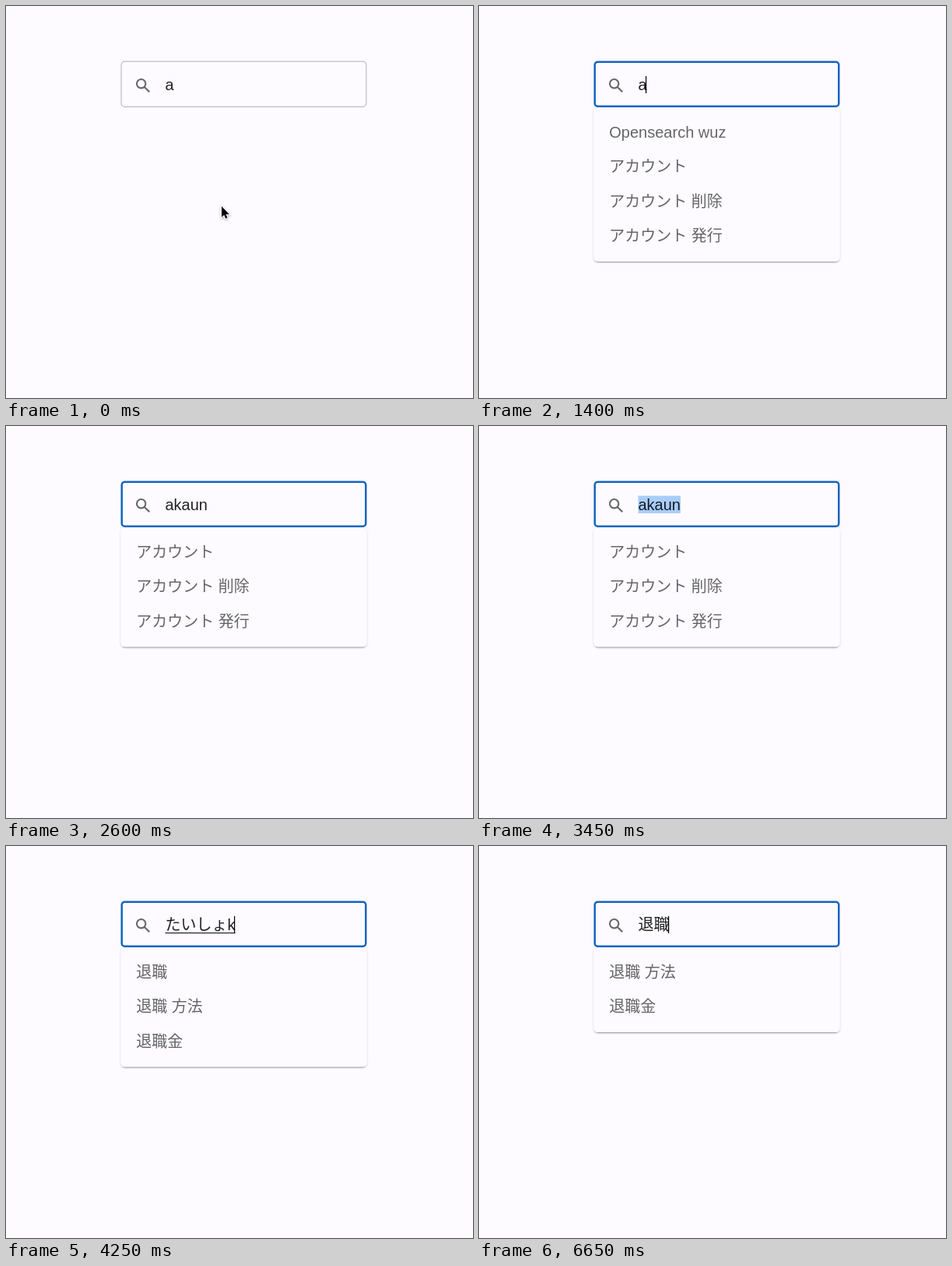
These frames come from a looping animation (600x503 px, 6800 ms). An HTML page with a canvas:

```html
<!DOCTYPE html>
<html lang="ja">
<head>
<meta charset="utf-8">
<title>Search suggestions</title>
<style>
  html, body { margin: 0; width: 100%; height: 100%; overflow: hidden; background: #fdfbff; }
  canvas { display: block; }
</style>
</head>
<body>
<canvas id="stage" width="600" height="503"></canvas>
<script>
const ctx = document.getElementById('stage').getContext('2d');
const LOOP = 6800;
const BACKGROUND = '#fdfbff';
const FONT = '20px "Liberation Sans", "Noto Sans CJK JP", "Noto Sans CJK", sans-serif';
const BOX = { x: 147.5, y: 70.5, w: 316, h: 59.5, radius: 5 };
const TEXT_X = 204.5;
const ROW_HEIGHT = 44.45;
const FOCUS_TIME = 600;

const account = ['アカウント', 'アカウント 削除', 'アカウント 発行'];
const retire = ['退職', '退職 方法', '退職金'];
const search = 'Opensearch wuz';

// [start time, text, style]
const inputs = [
  [0, 'a'], [FOCUS_TIME, 'a'], [900, ''],
  [1250, 'a'], [1450, 'ak'], [1600, 'aka'], [1800, 'akau'], [2100, 'akaun'],
  [3450, 'akaun', 'selected'],
  [3650, 't', 'composing'], [3750, 'た', 'composing'], [3850, 'たい', 'composing'],
  [3950, 'たいs', 'composing'], [4050, 'たいsh', 'composing'], [4100, 'たいしょ', 'composing'],
  [4200, 'たいしょk', 'composing'], [4300, 'たいしょく', 'composing'],
  [4450, '退職', 'composing'], [4650, '退職']
];

// [start time, suggestions]
const lists = [
  [0, []],
  [1350, [search, ...account]],
  [1500, [...account, ...retire]],
  [1800, account],
  [3700, [search, ...account, ...retire, 'Opensearch']],
  [3900, retire],
  [4400, [...retire, ...account]],
  [4600, retire.slice(1)]
];

const current = (events, t) => events.findLast(event => event[0] <= t);

function roundedRect(x, y, w, h, radius) {
  ctx.beginPath();
  ctx.roundRect(x, y, w, h, radius);
}

function drawPanel(items) {
  if (!items.length) return;
  const top = BOX.y + BOX.h;
  const layers = [[2.5, 1.2, 1.2, .2], [1.2, 1.2, 0, .14], [1.2, 3.7, 0, .12]];
  const height = 20 + ROW_HEIGHT * items.length;
  ctx.save();
  ctx.beginPath();
  ctx.rect(0, top, 600, 503);
  ctx.clip();
  ctx.fillStyle = BACKGROUND;
  for (const [offset, blur, inset, alpha] of layers) {
    ctx.shadowColor = `rgba(0,0,0,${alpha})`;
    ctx.shadowOffsetY = offset;
    ctx.shadowBlur = blur;
    roundedRect(BOX.x + inset, top + inset, BOX.w - 2 * inset, height - 2 * inset, BOX.radius);
    ctx.fill();
  }
  ctx.shadowColor = 'transparent';
  roundedRect(BOX.x, top, BOX.w, height, BOX.radius);
  ctx.fill();
  ctx.fillStyle = 'rgba(0,0,0,.6)';
  items.forEach((item, i) => ctx.fillText(item, 167.3, 169 + i * ROW_HEIGHT));
  ctx.restore();
}

function drawBox(focused, hovered) {
  const line = focused ? 2.5 : 1.2;
  roundedRect(BOX.x + line / 2, BOX.y + line / 2, BOX.w - line, BOX.h - line, BOX.radius - line / 2);
  ctx.lineWidth = line;
  ctx.strokeStyle = focused ? '#1565c0' : hovered ? 'rgba(0,0,0,.87)' : 'rgba(0,0,0,.25)';
  ctx.stroke();
}

function drawMagnifier() {
  ctx.strokeStyle = '#666';
  ctx.lineWidth = 2.1;
  ctx.beginPath();
  ctx.arc(173.7, 99.7, 5.7, 0, 7);
  ctx.moveTo(177.9, 103.9);
  ctx.lineTo(184.3, 110.3);
  ctx.stroke();
}

function drawInput(t) {
  const [start, text, style] = current(inputs, t);
  const width = ctx.measureText(text).width;
  if (style === 'selected') {
    ctx.fillStyle = '#a8cdfb';
    ctx.fillRect(TEXT_X, 89.5, width, 22.5);
  }
  ctx.fillStyle = 'rgba(0,0,0,.87)';
  ctx.fillText(text, TEXT_X, 108);
  if (style === 'composing') ctx.fillRect(TEXT_X, 111, width, 1.2);
  const blinkOn = Math.floor((t - start) / 500) % 2 === 0;
  if (t >= FOCUS_TIME && style !== 'selected' && blinkOn) {
    ctx.fillStyle = '#000';
    ctx.fillRect(Math.floor(TEXT_X + width - .7), 90, 1.2, 22);
  }
}

function pointerAt(t) {
  const p = Math.min(1, Math.max(0, (t - 50) / 500));
  const eased = p * p * (3 - 2 * p);
  return { x: 277 - 22 * eased, y: 257 - 156 * eased };
}

function drawArrow(x, y) {
  const outline = [[0, 0], [0, 14], [3.2, 11], [5.3, 15.8], [7.5, 14.8], [5.5, 10.2], [10, 10.2]];
  ctx.save();
  ctx.translate(x, y);
  ctx.beginPath();
  outline.forEach(point => ctx.lineTo(...point));
  ctx.closePath();
  ctx.shadowColor = 'rgba(0,0,0,.35)';
  ctx.shadowBlur = 3;
  ctx.shadowOffsetY = 1;
  ctx.strokeStyle = '#fff';
  ctx.lineWidth = 2;
  ctx.stroke();
  ctx.shadowColor = 'transparent';
  ctx.fillStyle = '#000';
  ctx.fill();
  ctx.restore();
}

function drawBeam(x, y) {
  ctx.strokeStyle = '#222';
  ctx.lineWidth = 1.2;
  ctx.beginPath();
  for (const side of [-1, 1]) {
    ctx.moveTo(x - 3.5, y + side * 9);
    ctx.quadraticCurveTo(x, y + side * 9, x, y + side * 6);
    ctx.quadraticCurveTo(x, y + side * 9, x + 3.5, y + side * 9);
  }
  ctx.moveTo(x, y - 7);
  ctx.lineTo(x, y + 7);
  ctx.stroke();
}

function draw(t) {
  const pointer = pointerAt(t);
  const hovered = pointer.y < BOX.y + BOX.h;
  ctx.fillStyle = BACKGROUND;
  ctx.fillRect(0, 0, 600, 503);
  ctx.font = FONT;
  drawPanel(current(lists, t)[1]);
  drawBox(t >= FOCUS_TIME, hovered);
  drawMagnifier();
  drawInput(t);
  if (t < 900) (hovered ? drawBeam : drawArrow)(pointer.x, pointer.y);
}

const began = performance.now();
function frame() {
  draw((performance.now() - began) % LOOP);
  requestAnimationFrame(frame);
}
frame();
</script>
</body>
</html>
```
